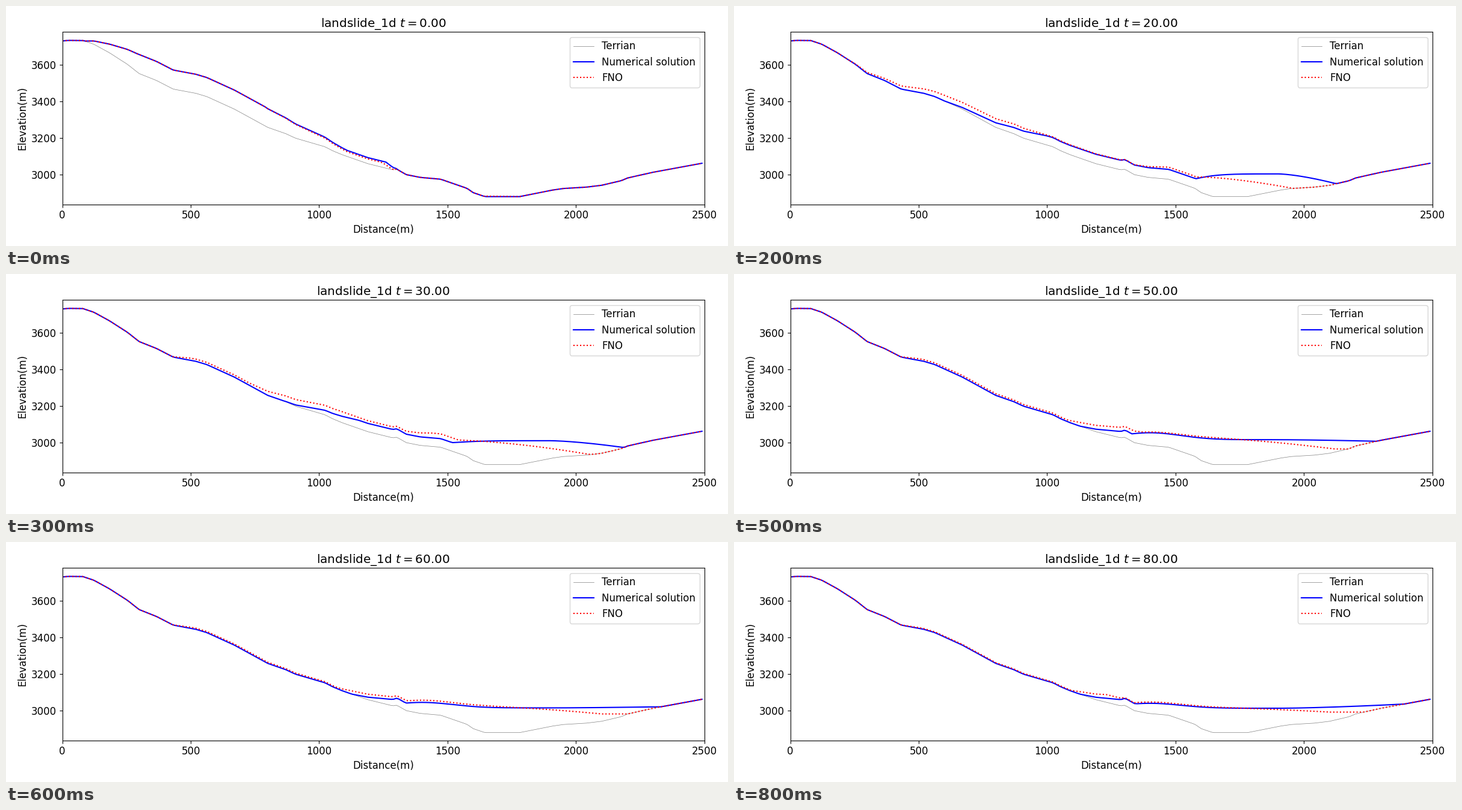
Recreate the animation shown at these times as a matplotlib script. Size 1200 by 400 pixels, loop 0.9 s.

```python
import numpy as np
import matplotlib.pyplot as plt
from matplotlib.animation import FuncAnimation

plt.rcParams.update({"font.family": "DejaVu Sans", "font.size": 12})

x = np.arange(0, 2491, 10)


def ramp(a, b):
    """0 before a, 1 after b, straight in between."""
    return np.clip((x - a) / (b - a), 0, 1)


# Breaks of slope along the mountainside, the valley floor and the far bank
breaks = [
    (0, 3729), (25, 3732), (80, 3731), (123, 3711), (184, 3664), (254, 3601),
    (299, 3551), (367, 3513), (432, 3466), (520, 3443), (563, 3425),
    (671, 3356), (800, 3257), (868, 3224), (908, 3198), (1023, 3151),
    (1053, 3129), (1091, 3107), (1189, 3059), (1287, 3025), (1302, 3029),
    (1339, 2999), (1393, 2984), (1473, 2974), (1576, 2924), (1599, 2901),
    (1645, 2879), (1780, 2879), (1905, 2914), (1948, 2923), (2042, 2931),
    (2100, 2941), (2176, 2966), (2201, 2981), (2300, 3012), (2386, 3034),
    (2490, 3061)]
ground = np.interp(x, *zip(*breaks))

# Each slide is a sheet on the slope (tail to brink) running into a pool
# (level, falling by drop from brow to front); values hold at these times.
key_times = [0, 10, 20, 40, 60, 80]
numerical = dict(
    tail=[86, 214, 600, 1128, 1128, 1128],
    full=[300, 430, 1000, 1310, 1310, 1310],
    depth=[104, 65, 50, 40, 40, 39],
    toe=[33, 38, 54, 40, 40, 39],
    sag=[790, 1330, 1000, 1300, 1300, 1300],
    foot=[1110, 1530, 1500, 1500, 1500, 1500],
    brink=[1305, 1700, 1650, 1600, 1600, 1600],
    trail=0,
    level=[2860, 2914, 3003, 3016, 3014, 3012],
    swell=[0, 0, -80, 46, 30, 27],
    brow=[1600, 1650, 1900, 1900, 1900, 1900],
    front=[1800, 1857, 2126, 2265, 2328, 2376],
    drop=[0, 16, 54, 24, -6, -22])
operator = dict(
    tail=[86, 100, 230, 1040, 1040, 1080],
    full=[300, 360, 880, 1290, 1300, 1230],
    depth=[104, 72, 54, 66, 52, 42],
    toe=[26, 36, 66, 80, 60, 44],
    sag=[790, 950, 1340, 1300, 1300, 1300],
    foot=[1110, 1500, 1473, 1400, 1400, 1400],
    brink=[1290, 1660, 1640, 1600, 1600, 1600],
    trail=[0, 0, 12, 12, 6, 4],
    level=[2882, 2905, 2986, 3024, 3023, 3016],
    swell=[0, 0, 0, 34, 33, 30],
    brow=[1600, 1650, 1600, 1620, 1620, 1620],
    front=[1800, 1831, 1960, 2136, 2100, 2100],
    drop=[4, 22, 63, 76, 42, 25])


def surface(plan, t):
    """Elevation of the slide, or of the bare ground where it is absent."""
    p = {name: np.interp(t, key_times, np.broadcast_to(v, len(key_times)))
         for name, v in plan.items()}
    body = p["depth"] + (p["toe"] - p["depth"]) * ramp(p["sag"], p["foot"])
    sheet = body * ramp(p["tail"], p["full"])
    sheet = np.maximum(sheet, p["trail"] * ramp(420, 500))
    sheet *= 1 - ramp(p["brink"] - 45, p["brink"])
    pool = (p["level"] + p["swell"] * np.exp(-((x - 1400) / 170) ** 2)
            - p["drop"] * ramp(p["brow"], p["front"]) ** 1.5)
    return np.maximum(ground + sheet, pool)


fig, ax = plt.subplots(figsize=(12, 4), dpi=100)
ax.plot(x, ground, color="gray", lw=0.5, label="Terrian")
num_line, = ax.plot(x, ground, "b-", label="Numerical solution")
fno_line, = ax.plot(x, ground, "r:", label="FNO")
ax.set_xlim(0, 2500)
ax.set_ylim(2836.3, 3777.8)
ax.set_xlabel("Distance(m)")
ax.set_ylabel("Elevation(m)")
ax.legend(loc="upper right")
title = ax.set_title("")


def update(i):
    t = 10 * i
    num_line.set_ydata(surface(numerical, t))
    fno_line.set_ydata(surface(operator, t))
    title.set_text(f"landslide_1d $t={t:.2f}$")
    return num_line, fno_line, title


update(0)
fig.tight_layout()
anim = FuncAnimation(fig, update, frames=9, interval=100,
                     repeat=True, repeat_delay=0, blit=False)
plt.show()
```
